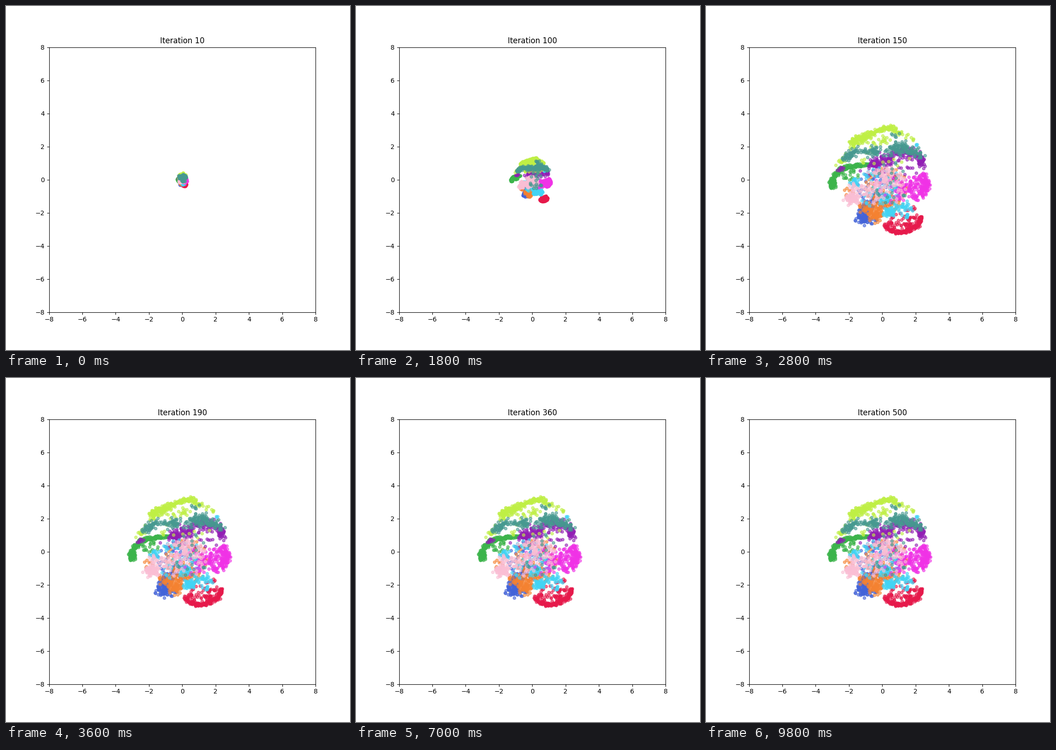
A matplotlib script for the animation above (10 s loop, 748 by 748 pixels).

```python
import numpy as np
import matplotlib.pyplot as plt
from matplotlib.animation import FuncAnimation

STEPS = 50
rng = np.random.default_rng(4)


def bell(n):
    """Bounded bell-shaped noise in 2D, unit deviation."""
    return rng.uniform(-1, 1, (n, 2, 3)).sum(axis=-1)


def blob(n, x, y, sx, sy):
    return np.array([x, y]) + bell(n) * [sx, sy]


def disc(n, x, y, rx, ry):
    a = rng.uniform(0, 2 * np.pi, n)
    r = np.sqrt(rng.uniform(0, 1, n))
    return np.column_stack([x + rx * r * np.cos(a), y + ry * r * np.sin(a)])


def arc(n, width, *knots):
    k = np.array(knots)
    t = rng.uniform(0, len(k) - 1, n)
    i = np.arange(len(k))
    line = np.column_stack([np.interp(t, i, k[:, 0]), np.interp(t, i, k[:, 1])])
    return line + bell(n) * width


# colour, compact centre, pull towards it, pieces of the settled cluster
clusters = [
    ("#e6194b", (.85, -1.27), .5, [
        arc(165, .055, (.1, -2.8), (.45, -3.05), (.85, -3.18), (1.3, -3.15),
            (1.8, -2.98), (2.2, -2.75), (2.33, -2.2)),
        arc(45, .14, (.1, -2.7), (.9, -2.75), (1.7, -2.75), (2.2, -2.3)),
        disc(35, 1.35, -2.35, .95, .55),
        blob(5, 1.9, -1.75, .12, .12)]),
    ("#3cb44b", (-1.27, .05), .45, [
        blob(90, -3.02, -.2, .09, .17),
        arc(65, .08, (-3.0, .1), (-2.75, .4), (-2.5, .65), (-2.2, .75)),
        arc(85, .06, (-2.4, .7), (-1.9, .82), (-1.4, .9), (-.75, .93)),
        disc(22, -2.1, .3, .7, .35)]),
    ("#4363d8", (-.35, -.8), .3, [
        blob(85, -1.12, -2.35, .2, .2),
        arc(75, .17, (-1.3, -1.9), (-.9, -1.6), (-.5, -1.2), (-.3, -.8)),
        disc(70, -.2, -.5, 1.3, 1.2),
        blob(20, -.55, -2.35, .25, .22)]),
    ("#f58231", (-.2, -.95), .3, [
        blob(75, -.4, -2.1, .2, .2),
        arc(75, .17, (-1.35, -1.65), (-.6, -1.75), (.2, -1.6), (1.0, -1.5)),
        disc(90, .25, -.4, 1.3, 1.2),
        blob(10, -2.0, -.8, .15, .2)]),
    ("#911eb4", (.1, .55), .1, [
        blob(50, -.45, .95, .16, .14),
        arc(115, .2, (-.3, 1.1), (.5, 1.35), (1.2, 1.55), (2.0, 1.5)),
        blob(45, 2.32, 1.2, .1, .22),
        disc(32, .4, .6, 1.8, .55),
        blob(8, -2.45, .6, .12, .1)]),
    ("#42d4f4", (.2, -.75), .2, [
        blob(35, -1.7, -.2, .13, .13),
        blob(50, .4, -1.95, .19, .13),
        blob(25, .15, -1.05, .18, .12),
        arc(40, .15, (.8, -1.9), (1.3, -1.5), (1.6, -1.8), (1.5, -2.3)),
        disc(75, -.1, -.5, 1.4, 1.3),
        blob(3, 2.05, 2.15, .04, .04)]),
    ("#f032e6", (.95, -.2), .25, [
        arc(90, .1, (2.35, .35), (2.6, .05), (2.68, -.4), (2.4, -.8)),
        disc(90, 2.15, -.5, .6, .75),
        blob(45, 1.25, -.55, .25, .28),
        disc(30, .5, -.5, 1.5, 1.0)]),
    ("#bfef45", (0, 1.12), .1, [
        arc(115, .11, (-1.9, 2.15), (-1.65, 2.45), (-1.1, 2.65), (-.5, 2.9)),
        arc(65, .08, (-.4, 2.95), (0, 3.12), (.45, 3.15), (.8, 3.0)),
        arc(20, .09, (.8, 2.95), (1.3, 2.8), (1.8, 2.45)),
        disc(38, -.7, 2.4, 1.2, .4),
        arc(16, .11, (-2.7, .9), (-2.35, 1.3), (-2.0, 2.0)),
        disc(14, -.3, 1.2, 2.0, .5)]),
    ("#fabed4", (-.45, -.15), .25, [
        blob(90, -1.85, -1.1, .21, .2),
        arc(25, .14, (-2.1, -.5), (-1.5, -.4), (-1.0, -.7)),
        disc(85, .1, -.4, 1.4, 1.2),
        blob(50, .25, .15, .35, .3)]),
    ("#469990", (.1, .75), .05, [
        arc(95, .14, (-2.2, 1.3), (-1.8, 1.65), (-1.0, 1.7), (-.2, 1.75)),
        arc(100, .18, (-.2, 1.75), (.7, 1.85), (1.2, 2.0), (1.6, 1.85)),
        arc(35, .14, (1.6, 1.85), (2.0, 1.7), (2.35, 1.5)),
        blob(6, .75, 2.65, .15, .14),
        disc(20, .6, -.2, 1.0, 1.5)]),
]

fig = plt.figure(figsize=(7.48, 7.48), dpi=100)
ax = fig.add_subplot()
ax.set_xlim(-8, 8)
ax.set_ylim(-8, 8)
title = ax.set_title("Iteration 10")

layers = []
for color, centre, pull, pieces in clusters:
    final = np.vstack(pieces)
    compact = (1 - pull) * .41 * final + pull * np.array(centre)
    seed = compact * [.19, .25] + .035 * bell(len(final))
    dots = ax.scatter(seed[:, 0], seed[:, 1], s=20, c=color, alpha=.6)
    layers.append((dots, seed, compact, final))


def draw(i):
    it = 10 * (i + 1)
    grow = 1 - np.exp(-(it - 10) / 15)
    spread = 1 - np.exp(-max(it - 100, 0) / 11)
    for dots, seed, compact, final in layers:
        tight = seed + (compact - seed) * grow
        dots.set_offsets(tight + (final - tight) * spread)
    title.set_text(f"Iteration {it}")
    return [title] + [layer[0] for layer in layers]


def start():
    return draw(0)


anim = FuncAnimation(fig, draw, frames=STEPS, init_func=start,
                     interval=200, repeat=True, repeat_delay=0, blit=False)
plt.show()
```
